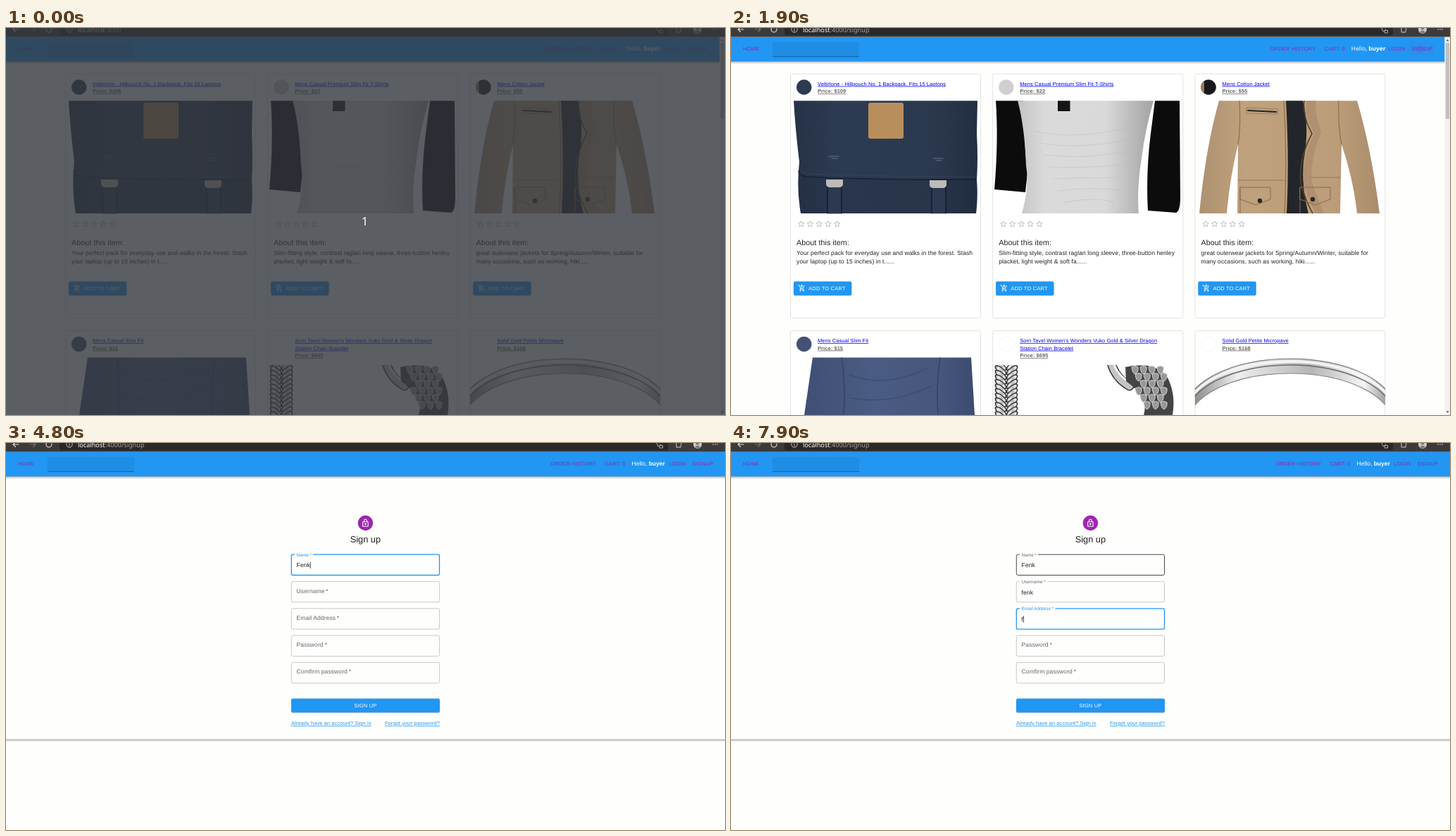
An HTML page that plays this animation: 1021 px wide and 549 px high, repeating every 8000 ms.

```html
<!DOCTYPE html>
<html lang="en">
<head>
<meta charset="utf-8">
<title>Shop sign-up</title>
<style>
html, body { margin: 0; width: 100%; height: 100%; overflow: hidden; background: #fefefd; }
#stage { display: block; width: 1021px; height: 549px; }
text { font-family: "Liberation Sans", Arial, sans-serif; fill: #212121; text-rendering: geometricPrecision; white-space: pre; }
.body { font-size: 8.53px; letter-spacing: .0094em; }
.small { font-size: 7.47px; letter-spacing: .0107em; }
.btn { font-size: 7.47px; letter-spacing: .0286em; fill: #fff; }
.nav { fill: #9027ad; }
.link { fill: #0000ee; text-decoration: underline; }
.price { fill: #666; font-weight: bold; text-decoration: underline; }
.blue { fill: #2196f3; text-decoration: underline; }
.h6 { font-size: 10.67px; letter-spacing: .0075em; }
.h5 { font-size: 12.8px; }
.hello { font-size: 8.53px; fill: #fff; }
.ui { font-family: "Noto Sans", "Open Sans", sans-serif; font-size: 9.15px; fill: #fff; }
.line { fill: none; stroke-linecap: round; stroke-linejoin: round; }
</style>
</head>
<body>
<svg id="stage" viewBox="0 0 1021 549" xmlns="http://www.w3.org/2000/svg">
  <defs>
    <linearGradient id="shade" x2="0" y2="1">
      <stop offset="0" stop-opacity=".4"/><stop offset=".4" stop-opacity=".16"/><stop offset="1" stop-opacity="0"/>
    </linearGradient>
    <linearGradient id="navy"><stop stop-color="#253247"/><stop offset=".25" stop-color="#2d3b52"/><stop offset=".75" stop-color="#2b394f"/><stop offset="1" stop-color="#222e42"/></linearGradient>
    <linearGradient id="grey"><stop stop-color="#c4c4c4"/><stop offset=".2" stop-color="#dadada"/><stop offset=".65" stop-color="#d9d9d9"/><stop offset="1" stop-color="#a2a2a2"/></linearGradient>
    <linearGradient id="tan"><stop stop-color="#ad9170"/><stop offset=".25" stop-color="#c0a17d"/><stop offset=".75" stop-color="#bc9d79"/><stop offset="1" stop-color="#a98c6b"/></linearGradient>
    <linearGradient id="denim"><stop stop-color="#3f4f74"/><stop offset=".4" stop-color="#4b5c84"/><stop offset=".8" stop-color="#46567d"/><stop offset="1" stop-color="#3c4b6f"/></linearGradient>
    <linearGradient id="silver"><stop stop-color="#777"/><stop offset=".25" stop-color="#eee"/><stop offset=".6" stop-color="#b5b5b5"/><stop offset=".85" stop-color="#f4f4f4"/><stop offset="1" stop-color="#777"/></linearGradient>
    <path id="star" d="M12 4L14.2 9.3 20 9.8 15.6 13.6 16.9 19.2 12 16.2 7.1 19.2 8.4 13.6 4 9.8 9.8 9.3Z" fill="none" stroke="#b8b8b8" stroke-width="1.7"/>
    <g id="cart" class="line" stroke="#fff" stroke-width="2">
      <path d="M1 3H4L8 12H16L20 4.5M8 12L6 15.5Q6 16 7 16H19M12 1V9M8 5H16"/>
      <circle cx="7" cy="20" r="1.2"/><circle cx="17" cy="20" r="1.2"/>
    </g>
  </defs>
  <rect width="1021" height="549" fill="#fefefd"/>
  <g id="shop"></g>
  <g id="signup"></g>
  <g id="chrome"></g>
  <g id="countdown">
    <rect width="1021" height="549" fill="#32363c" fill-opacity=".8"/>
    <text class="ui" x="509.5" y="280" text-anchor="middle" style="font-size:16.5px">1</text>
  </g>
</svg>
<script>
const $ = id => document.getElementById(id);
const text = (x, y, cls, s, more = '') => `<text x="${x}" y="${y}" class="${cls}" ${more}>${s}</text>`;
const rect = (x, y, w, h, fill, more = '') => `<rect x="${x}" y="${y}" width="${w}" height="${h}" fill="${fill}" ${more}/>`;
const path = (d, fill, more = '') => `<path d="${d}" fill="${fill}" ${more}/>`;
const line = (d, stroke, w = 1, more = '') => `<path class="line" d="${d}" stroke="${stroke}" stroke-width="${w}" ${more}/>`;
const disc = (x, y, r, fill, more = '') => `<circle cx="${x}" cy="${y}" r="${r}" fill="${fill}" ${more}/>`;
const oval = (x, y, rx, ry, stroke, w) => `<ellipse cx="${x}" cy="${y}" rx="${rx}" ry="${ry}" fill="none" stroke="${stroke}" stroke-width="${w}"/>`;
const range = (n, f) => Array.from({ length: n }, (_, i) => f(i)).join('');

function header(width, dx, helloClass, size, hot) {
  const nav = (x, s) => text(x + dx, 32, 'btn nav', s);
  return rect(0, 47, width, 4.5, 'url(#shade)') + rect(0, 12.6, width, 34.7, '#2196f3')
    + rect(59, 20, 123, 21, '#1f8de4', 'rx="2"') + rect(59, 40.3, 123, .8, '#14588f')
    + hot + text(17, 32, 'btn nav', 'HOME')
    + nav(765.6, 'ORDER HISTORY') + nav(842.8, 'CART: 0') + nav(933.3, 'LOGIN') + nav(966.6, 'SIGNUP')
    + text(880.8 + dx, 31.6, helloClass, 'Hello, <tspan font-weight="bold">buyer</tspan>', `style="font-size:${size}px"`);
}

const art = {
  bag: () => path('M89 103H350L349 150Q351 185 349 215Q351 240 348 263H99Q93 228 97 190Q91 140 89 103Z', 'url(#navy)')
    + path('M96 203Q98 210 107 211Q220 216 348 215V263H99Q93 228 96 203Z', '#1d2739', 'opacity=".2"')
    + line('M96 203Q98 210 107 211Q220 216 348 215', '#182130', 1.6)
    + line('M97 199Q99 205 108 207Q220 211 347 211', '#3d4a61', .6)
    + range(2, i => rect(137 + i * 148, 222 + i, 20, 42, '#2c3a51', 'stroke="#151d2b" stroke-width="1.6"')
      + path(`M${135 + i * 147} ${215 + i}h24v7q-1 4-5 4h-14q-4 0-5-4z`, '#bebcb7')
      + line(`M${139 + i * 148} ${182 + i * 3}h14m-10 3h8`, '#71809b', .8))
    + rect(195, 106, 50, 51, '#b88f5c', 'rx="3"'),

  tee: () => path('M376 103H415Q418 190 421 206L418 233L374 229Q380 160 376 103Z', '#0c0c0d')
    + path('M602 103H637L638 240Q638 260 632 262L592 259Q589 205 596 150Z', '#0c0c0d')
    + path('M407 103H600Q588 145 583 185Q576 230 579 263H413Q424 225 419 195Q417 140 407 103Z', 'url(#grey)')
    + range(7, i => line(`M${430 + i * 7} ${146 + i * 17}Q${490 + i * 5} ${160 + i * 13} ${568 - i * 4} ${140 + i * 18}`, '#b3b3b3', 1.2, 'opacity=".4"'))
    + rect(464, 103, 17.5, 15, '#151515'),

  jacket: () => path('M693 103H889Q909 170 921 263H889Q884 215 867 165L865 263H719L720 165Q708 215 704 263H665Q674 170 693 103Z', 'url(#tan)')
    + path('M788 103H812Q822 140 813 190Q810 225 820 263H789Q793 190 788 103Z', '#22262a')
    + path('M817 103Q814 125 828 150Q810 185 813 220Q820 245 830 263H842Q830 235 824 215Q824 180 838 148Q828 120 831 103Z', '#b09070')
    + line('M814 103Q811 125 825 150Q806 185 809 220Q816 245 826 263', '#52402f', 1.6)
    + line('M722 103Q724 140 720 165M863 103Q862 140 867 165M785 103Q790 180 786 263', '#896c4d', 1.2)
    + line('M734 117L774 119', '#252321', 2.2) + line('M732 113L776 115V122L732 121Z', '#8f7251', .8)
    + line('M720 216H786M822 212H865', '#967856', 1)
    + range(2, i => line(`M${723 + i * 85} 226h43v17l-21 8l-22-8zv37`, '#876a4b', 1) + disc(751 + i * 75, 245 - i * 2, 3.2, '#2a2522')),

  shirt: () => path('M116 467H341L346 549H104Z', 'url(#denim)')
    + line('M157 467Q163 505 160 549M297 467Q291 505 294 549', '#33436a', 1.6)
    + line('M168 492Q220 512 280 482M170 525Q230 535 284 508', '#3c4c75', 1.4),

  chain: () => range(24, i => {
      const side = i % 2, x = 383 + side * 16, y = 479 + (i >> 1) * 6.5;
      return `<ellipse cx="${x}" cy="${y}" rx="9.5" ry="3.6" fill="url(#silver)" stroke="#2c2c2c" stroke-width="1.3" transform="rotate(${side ? -38 : 38} ${x} ${y})"/>`;
    })
    + line('M540 476Q547 498 566 508', '#333', 13) + line('M540 476Q547 498 566 508', '#c4c4c4', 10)
    + line('M543 476Q550 494 568 504', '#f2f2f2', 3)
    + path('M560 481Q603 472 620 496Q632 520 627 549H586Q594 525 561 501Z', '#444')
    + range(26, i => {
      const r = i >> 2, x = 574 + (i % 4) * 12 + (r % 2) * 5, y = 485 + r * 10;
      return x < 624 && x > 566 + r * 4 ? path(`M${x - 5} ${y - 4}Q${x - 4} ${y + 5} ${x} ${y + 6}Q${x + 5} ${y + 3} ${x + 4} ${y - 4}Q${x} ${y - 7} ${x - 5} ${y - 4}`, '#989898', 'stroke="#d0d0d0"') : '';
    }),

  ring: () => path('M644 545A150 76 0 0 1 944 545V562H940A146 72 0 0 0 648 562H644Z', 'url(#silver)')
    + oval(794, 545, 150, 76, '#808080', 1.2) + oval(794, 549, 149, 76, '#f3f3f3', 4)
    + oval(794, 553, 148, 75, '#6a6a6a', 1.4) + oval(794, 562, 146, 72, '#888', 1.2)
};

function card(col, row, { title, price, kind, tone, about = [] }) {
  const x = 84.5 + col * 287.2, y = 65 + row * 364.4;
  const priceY = y + 16.5 + title.length * 10.7, top = y + 16.8 + title.length * 10.7 + 10.7;
  return rect(x, y, 270, 346.5, '#fff', 'rx="2.2" stroke="#dfdfdf" stroke-width=".9"')
    + disc(x + 19.2, y + 19, 10.7, tone, tone === '#fff' ? 'stroke="#f1f1f1" stroke-width=".7"' : '')
    + (kind === 'jacket' ? path(`M${x + 13} ${y + 10}A10.7 10.7 0 0 0 ${x + 13} ${y + 28}Z`, '#9b7d5d') : '')
    + title.map((s, i) => text(x + 38.5, y + 16.6 + i * 10.7, 'small link', s)).join('')
    + text(x + 38.5, priceY, 'small price', 'Price: $' + price)
    + `<svg x="${x}" y="${top}" width="270" height="160" viewBox="${x} ${top} 270 160">${art[kind]()}</svg>`
    + (about.length ? range(5, i => `<use href="#star" transform="translate(${x + 8.7 + i * 12.8} ${y + 206.7}) scale(.533)"/>`)
      + text(x + 8.6, y + 242.7, 'h6', 'About this item:')
      + about.map((s, i) => text(x + 8.6, y + 256.6 + i * 12.8, 'body', s)).join('')
      + rect(x + 4.4, y + 295.6, 82.4, 19.6, '#000', 'rx="2.2" opacity=".2"')
      + rect(x + 4.4, y + 294.6, 82.4, 19.6, '#2196f3', 'rx="2.2"')
      + `<use href="#cart" transform="translate(${x + 10.5} ${y + 298.6}) scale(.46)"/>`
      + text(x + 25.6, y + 307, 'btn', 'ADD TO CART') : '');
}

const goods = [
  { title: ['Veltirlone - Hillpouch No. 1 Backpack, Fits 15 Laptops'], price: 109, kind: 'bag', tone: '#2e3a52',
    about: ['Your perfect pack for everyday use and walks in the forest. Stash', 'your laptop (up to 15 inches) in t......'] },
  { title: ['Mens Casual Premium Slim Fit T-Shirts'], price: 22, kind: 'tee', tone: '#cfcfcf',
    about: ['Slim-fitting style, contrast raglan long sleeve, three-button henley', 'placket, light weight &amp; soft fa......'] },
  { title: ['Mens Cotton Jacket'], price: 55, kind: 'jacket', tone: '#17191a',
    about: ['great outerwear jackets for Spring/Autumn/Winter, suitable for', 'many occasions, such as working, hiki......'] },
  { title: ['Mens Casual Slim Fit'], price: 15, kind: 'shirt', tone: '#435174' },
  { title: ["Sorn Tavel Women's Wonders Vuko Gold &amp; Silver Dragon", 'Station Chain Bracelet'], price: 695, kind: 'chain', tone: '#fff' },
  { title: ['Solid Gold Petite Micropave'], price: 168, kind: 'ring', tone: '#fff' }
];

$('shop').innerHTML = goods.map((g, i) => card(i % 3, i / 3 | 0, g)).join('')
  + header(1013.6, 0, 'ui', 8.3, rect(962.5, 20, 38, 19, '#9c27b0', 'id="hover" rx="2"') + disc(979, 30, 6, '#9c27b0', 'id="ripple" opacity=".14"'))
  + rect(1013.6, 13, 7.4, 536, '#f1f1f1') + rect(1014.8, 21, 5.4, 108, '#c1c1c1')
  + path('M1015.6 18.5h4l-2-2.5zM1015.6 543.5h4l-2 2.5z', '#505050')
  + `<g id="status">${rect(0, 536, 108, 13, '#3b3b3b')}${text(5, 545.5, 'ui', 'localhost:4000/signup')}</g>`;

const labels = ['Name', 'Username', 'Email Address', 'Password', 'Comfirm password'];
const fieldTop = i => 158.2 + i * 38.3;

$('signup').innerHTML = rect(0, 420.5, 1021, 3.5, 'url(#shade)')
  + header(1021, 7.7, 'hello', 8.53, rect(970.2, 20, 38.6, 19.2, '#9c27b0', 'id="focus" rx="2"'))
  + disc(510.4, 113.5, 10.7, '#9c27b0')
  + `<g transform="translate(504 107) scale(.533)" class="line" stroke="#fff" stroke-width="2"><rect x="5" y="9" width="14" height="12" rx="1"/><path d="M8.5 9V6a3.5 3.5 0 0 1 7 0v3"/><circle cx="12" cy="15" r="1.2" fill="#fff"/></g>`
  + text(510.4, 141, 'h5', 'Sign up', 'text-anchor="middle"')
  + labels.map((s, i) => rect(405.3, fieldTop(i), 210.2, 29.3, 'none', `id="box${i}" rx="2.2"`)
    + rect(410, fieldTop(i) - 1.5, 0, 3, '#fefefd', `id="notch${i}"`)
    + text(0, 0, 'body', s + '\u2009*', `id="label${i}"`)
    + text(412.6, fieldTop(i) + 18, 'body', '', `id="value${i}"`)).join('')
  + rect(412.5, 168.6, .8, 9.4, '#222', 'id="caret"')
  + `<g id="suggest">${rect(412.5, 227.5, 147, 17, '#fff', 'stroke="#ccc" stroke-width=".7"')}${text(417, 239, 'body', 'fenk')}</g>`
  + rect(405, 363.6, 211, 19.6, '#000', 'rx="2.2" opacity=".22"') + rect(405, 362.6, 211, 19.6, '#2196f3', 'rx="2.2"')
  + text(510.4, 375, 'btn', 'SIGN UP', 'text-anchor="middle"')
  + text(405, 400, 'small blue', 'Already have an account? Sign in')
  + text(616, 400, 'small blue', 'Forgot your password?', 'text-anchor="end"');

$('chrome').innerHTML = rect(0, 0, 1021, 12.6, '#3b3b3b') + rect(76, -12, 864, 22.5, '#292929', 'rx="3"')
  + line('M18 2H10M13.5 -1.5L10 2L13.5 5.5', '#ddd', 1.1) + line('M34 2H42M38.5 -1.5L42 2L38.5 5.5', '#707070', 1.1)
  + line('M64.8 1A4 4 0 1 1 61 -2', '#ddd', 1.1)
  + disc(90, 2, 4.2, 'none', 'stroke="#ccc" stroke-width=".9"') + line('M90 1.8V4.2M90 0V.1', '#ccc', 1)
  + text(102, 6, 'ui', 'localhost<tspan style="fill:#a5a5a5" id="path"></tspan>')
  + line('M924 0L926 5L930 2M928.5 3.5h4v3.5h-4z', '#bbb', .9)
  + line('M952 -1V6H958V3.5Q960.5 2 958 .5V-1', '#ccc', 1)
  + disc(982, 2, 6, '#c9c9c9') + disc(982, .5, 2.2, '#777') + path('M978 6Q982 1.5 986 6Q982 9 978 6Z', '#777')
  + range(3, i => disc(1004 + i * 3, 2, .8, '#ddd'));

// Each entry: start time, active field, number of letters typed into it.
const typing = [
  [0, 0, 0], [4100, 0, 1], [4400, 0, 2], [4500, 0, 3], [4800, 0, 4],
  [5400, 1, 0], [5900, 1, 1], [6200, 1, 2], [6500, 1, 3], [7000, 1, 4],
  [7400, 2, 0], [7900, 2, 1]
];
const words = ['Fenk', 'fenk', 'fenk'];
const focusAt = [2000, 5400, 7400];
const glow = [[2100, .3], [2300, .15], [2500, .06], [2600, 0]];

const at = (table, t) => table.filter(row => row[0] <= t).pop() || table[0];
const ease = (t, start, span) => 1 - (1 - Math.min(1, Math.max(0, (t - start) / span))) ** 3;
const mix = (a, b, p) => `rgb(${a.map((v, i) => Math.round(v + (b[i] - v) * p))})`;
const set = (id, attrs) => { for (const k in attrs) $(id).setAttribute(k, attrs[k]); };
const show = (id, on) => { $(id).style.display = on ? '' : 'none'; };
const GREY = [102, 102, 102], BLUE = [33, 150, 243];

function drawField(i, t, active, count) {
  const start = focusAt[i] ?? Infinity, end = focusAt[i + 1] ?? Infinity;
  const p = i ? ease(t, start, 300) : 1, y = fieldTop(i), on = i === active;
  const tint = p * (1 - ease(t, end, 300)), scale = 1 - .25 * p;
  const label = $('label' + i), value = $('value' + i);
  set('label' + i, { transform: `translate(412.6 ${y + 16 - 13.6 * p}) scale(${scale})` });
  label.style.fill = mix(GREY, BLUE, tint);
  set('notch' + i, { width: p ? (label.getComputedTextLength() * .75 + 5) * p : 0 });
  const past = i === 0 && t >= 5400;
  set('box' + i, { stroke: on ? '#2196f3' : past ? '#333' : '#c2c2c2', 'stroke-width': on ? 1.3 : .9 });
  value.textContent = i < active ? words[i] : on ? words[i].slice(0, count) : '';
  if (on) set('caret', { x: 412.5 + (count ? value.getComputedTextLength() : 0), y: y + 10.5 });
}

function render(now) {
  const t = Math.floor(now % 8000 / 100) * 100;
  const onForm = t >= 2100;
  show('countdown', t < 100);
  show('shop', !onForm);
  show('signup', onForm);
  $('path').textContent = t < 1900 ? ':4000' : ':4000/signup';
  if (!onForm) {
    const fade = Math.min(1, Math.max(0, (t - 1400) / 300));
    set('hover', { opacity: .05 * fade });
    set('status', { opacity: t < 1900 ? fade : 0 });
    show('ripple', t >= 1900);
    return;
  }
  const [, active, count] = at(typing, t);
  set('focus', { opacity: at(glow, t)[1] });
  labels.forEach((_, i) => drawField(i, t, active, count));
  show('caret', t < 2600 || t >= 3200 && t < 3800 || t >= 4100);
  show('suggest', t >= 6000 && t < 6300);
}

const begin = performance.now();
function tick() {
  render(performance.now() - begin);
  requestAnimationFrame(tick);
}
tick();
</script>
</body>
</html>
```
